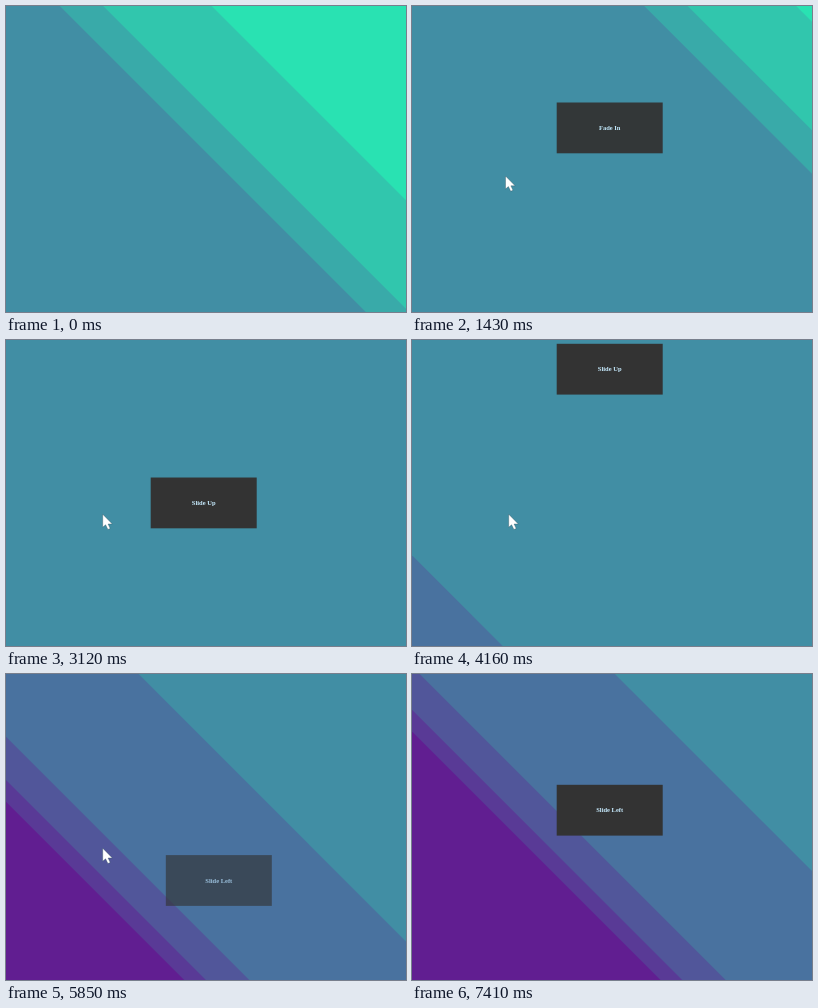
Animation of 400x306 px, one loop 7.54 s. Source, as an HTML page:

```html
<!DOCTYPE html>
<html lang="en">
<head>
<meta charset="utf-8">
<title>Scroll reveal</title>
<style>
  html, body { margin: 0; width: 100%; height: 100%; overflow: hidden; background: #428ca5; }
  svg { display: block; width: 100vw; height: 100vh; }
  text { font: bold 6.5px "Liberation Serif", "Times New Roman", serif;
         text-anchor: middle; fill: #c8ecff; }
</style>
</head>
<body>
<svg viewBox="0 0 400 306">
  <g id="page"></g>
  <path id="cursor" d="M0 0V13L2.9 10.6 5.2 15.3 7.5 14.3 5.4 9.8H9.6Z"
        fill="#fff" stroke="#2b4a58" stroke-opacity=".7" stroke-width=".5"/>
</svg>
<script>
const LOOP = 7540, STEP = 130, NOTCH = 59.5;
const page = document.getElementById('page');
const cursor = document.getElementById('cursor');

function add(parent, tag, attrs, text = '') {
  const el = document.createElementNS('http://www.w3.org/2000/svg', tag);
  for (const key in attrs) el.setAttribute(key, attrs[key]);
  el.textContent = text;
  return parent.appendChild(el);
}

const mix = (a, b, k) => a + (b - a) * k;
const progress = (t, start, duration) => Math.min(1, Math.max(0, (t - start) / duration));
const easeOut = (x, power) => 1 - (1 - x) ** power;
const place = (el, x, y) => el.setAttribute('transform', `translate(${x} ${y})`);

// Diagonal bands, bottom left to top right, in even colour steps from purple to mint.
const bandUnit = 21.7, bandWidths = [1, 2, 9, 37, 2, 5];
const bandColor = k => `rgb(${mix(97, 41, k)} ${mix(30, 226, k)} ${mix(145, 178, k)})`;
add(page, 'rect', { width: 400, height: 1400, fill: bandColor(0) });
let offset = -1009.5;
for (let i = 0; i <= bandWidths.length; i++) {
  const d = `M${offset - 200} -200L${offset + 1400} 1400H3000V-200Z`;
  add(page, 'path', { d, fill: bandColor((i + 1) / 7) });
  offset += bandWidths[i] * bandUnit;
}

const boxes = [
  { label: 'Fade In', start: 850, duration: 750, dx: 0, dy: 0 },
  { label: 'Slide Up', start: 2610, duration: 300, dx: 0, dy: 42 },
  { label: 'Slide Right', start: 4380, duration: 300, dx: -42, dy: 0 },
  { label: 'Slide Left', start: 5730, duration: 300, dx: 42, dy: 0 }
];
boxes.forEach((box, i) => {
  box.y = 275 + 262.6 * i;
  box.el = add(page, 'g', {});
  add(box.el, 'rect', { width: 106, height: 50.8, fill: '#333' });
  add(box.el, 'text', { x: 53, y: 27.5 }, box.label);
});

// Each spin of the wheel scrolls some notches and slows down.
const spins = [
  { start: 557, duration: 847, notches: 3 },
  { start: 1820, duration: 1110, notches: 3 },
  { start: 2900, duration: 350, notches: 1 },
  { start: 3770, duration: 695, notches: 3 },
  { start: 5070, duration: 846, notches: 5 },
  { start: 6370, duration: 780, notches: 1 }
];
const scrollAt = t => NOTCH * spins.reduce((sum, { start, duration, notches }) =>
  sum + notches * easeOut(progress(t, start, duration), 1.3), 0);

function draw(t) {
  place(page, 0, -scrollAt(t));
  for (const { el, y, start, duration, dx, dy } of boxes) {
    const shown = easeOut(progress(t, start, duration), 2);
    el.setAttribute('opacity', shown);
    place(el, 144.7 + dx * (1 - shown), y + dy * (1 - shown));
  }
  const enter = progress(t, 0, 780), nudge = progress(t, 1820, 390), leave = progress(t, 6370, 520);
  place(cursor, mix(24, 93.5, enter) + 3.2 * nudge - 57 * leave,
    mix(324, 170, enter) + 4.2 * nudge + 138 * leave);
}

const began = performance.now();
function tick() {
  const t = (performance.now() - began) % LOOP;
  draw(Math.floor(t / STEP) * STEP);
  requestAnimationFrame(tick);
}
tick();
</script>
</body>
</html>
```
